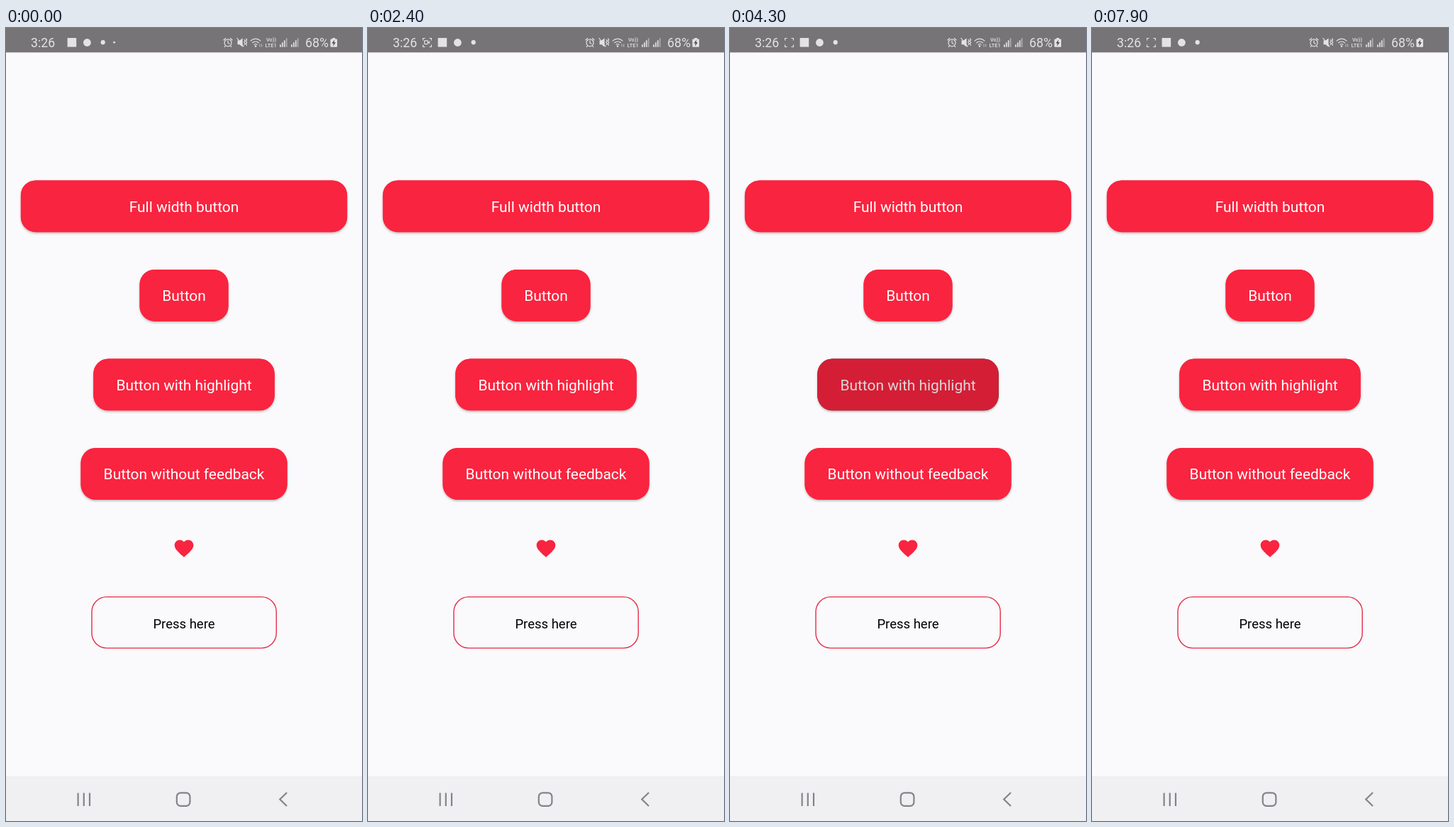
Recreate the animation shown at these times as an HTML page. Size 502x1116 px, loop 8000 ms.

```html
<!DOCTYPE html>
<html lang="en">
<head>
<meta charset="utf-8">
<title>Button feedback</title>
<style>
  html, body { margin: 0; width: 100%; height: 100%; overflow: hidden; background: #faf9fb; }
  svg { display: block; width: 502px; height: 1116px; }
  text { font-family: Roboto, sans-serif; }
  .label { font-size: 20.9px; fill: #fff; text-anchor: middle; }
  .face { fill: #f9243f; }
  .line { fill: none; stroke: #e4e3e4; stroke-width: 1.2; }
  .solid { fill: #e4e3e4; }
  .clock { font-size: 17.7px; fill: #e4e3e4; }
  .tiny { font-size: 7.4px; font-weight: 500; fill: #e4e3e4; }
  .nav { fill: none; stroke: #858387; stroke-width: 2.2; }
</style>
</head>
<body>
<svg viewBox="0 0 502 1116">
  <defs>
    <filter id="shadow" x="-10%" y="-20%" width="120%" height="150%">
      <feDropShadow dx="0" dy="1.8" stdDeviation="1.8" flood-color="#000" flood-opacity=".27"/>
    </filter>
  </defs>
  <rect width="502" height="1116" fill="#faf9fb"/>

  <g id="buttons"></g>

  <path class="face" transform="translate(235 716.4) scale(1.333)"
    d="M12 21.35l-1.45-1.32C5.4 15.36 2 12.28 2 8.5 2 5.42 4.42 3 7.5 3c1.74 0 3.41.81 4.5 2.09C13.09 3.81 14.76 3 16.5 3 19.58 3 22 5.42 22 8.5c0 3.78-3.4 6.86-8.55 11.54z"/>

  <rect x="121" y="800.6" width="260.2" height="72" rx="21" fill="none" stroke="#e42c48" stroke-width="1.4"/>
  <text x="251" y="844.5" font-size="18.5" text-anchor="middle">Press here</text>

  <!-- status bar -->
  <rect width="502" height="34.4" fill="#767476"/>
  <text class="clock" x="35" y="27">3:26</text>

  <g id="capture">
    <path class="line" d="M77.6 17.5v-3h3M86.4 14.5h3v3M89.4 23.5v3h-3M80.6 26.5h-3v-3"/>
    <g id="camera">
      <rect class="line" x="79.6" y="17.8" width="4.8" height="4.8" rx=".8" stroke-width="1"/>
      <path class="solid" d="M84.6 20.2l2.6-2.2v4.4z"/>
    </g>
  </g>
  <g id="notices">
    <rect class="solid" x="98.6" y="14" width="12.6" height="12.6"/>
    <circle class="solid" cx="126.4" cy="20.5" r="5.4"/>
    <circle class="solid" cx="148.7" cy="20.2" r="3.1"/>
  </g>
  <circle id="overflow" class="solid" cx="152.6" cy="20.2" r="1.4"/>

  <!-- alarm -->
  <g class="line" stroke-width="1.5">
    <circle cx="313" cy="20.8" r="5"/>
    <path d="M313 17.6v3.4l2.4 1.6M306.6 17.2l3.4-3M319.4 17.2l-3.4-3M309.4 25l-1.4 2M316.6 25l1.4 2"/>
  </g>
  <!-- muted sound with vibration -->
  <path class="solid" d="M326.5 17.6h3l4-3.4v12.6l-4-3.6h-3z"/>
  <path class="line" d="M325.6 14l9.6 12.4M335.8 16l1.4 2-1.4 2 1.4 2-1.4 2M338.4 14.6l1.2 2-1.2 2 1.2 2-1.2 2 1.2 2"/>
  <!-- wireless -->
  <path class="line" stroke-width="1.5" d="M344.6 18.4q7.4-6.6 14.8 0M347.2 21q4.8-4 9.6 0M349.6 23.4q2.4-1.8 4.8 0"/>
  <circle class="solid" cx="352" cy="25.6" r="1.3"/>
  <path class="line" stroke-width="1" d="M358 22.5v4M360.6 22.5v4" opacity=".6"/>
  <text class="tiny" x="367" y="18.6">Vo))</text>
  <text class="tiny" x="365.6" y="26.8">LTE1</text>
  <g id="signal" class="solid"></g>
  <text class="clock" x="422" y="27">68%</text>
  <path class="solid" d="M460.2 14h4v1.5h1.8q1 0 1 1v9.3q0 1-1 1h-7.6q-1 0-1-1v-9.3q0-1 1-1h1.8z"/>
  <path d="M463.4 16.5l-4 5h2.4l-.8 4 4-5.2h-2.4z" fill="#4c4a4c"/>

  <!-- navigation bar -->
  <rect y="1053" width="502" height="63" fill="#f0eff2"/>
  <path class="nav" d="M101.6 1076.5v18.5M109.8 1076.5v18.5M118 1076.5v18.5"/>
  <rect class="nav" x="240.8" y="1076.3" width="18.6" height="18.6" rx="5.4"/>
  <path class="nav" d="M396 1076l-9.8 9.5 9.8 9.5"/>
</svg>

<script>
const LOOP = 8000, FRAME = 50;
const HEIGHT = 72.8, CENTER_X = 251;
const ENTER = 225, FADE_IN = 75, FADE_OUT = 150, RIPPLE_ALPHA = 0.12;
const svgNS = 'http://www.w3.org/2000/svg';
const byId = id => document.getElementById(id);
const clamp = v => Math.min(1, Math.max(0, v));
const mix = (a, b, p) => a + (b - a) * p;

function add(parent, tag, attrs, text) {
  const node = document.createElementNS(svgNS, tag);
  set(node, attrs);
  if (text) node.textContent = text;
  return parent.appendChild(node);
}
function set(node, attrs) {
  for (const key in attrs) node.setAttribute(key, attrs[key]);
}

// cubic-bezier(.4, 0, .2, 1)
function fastOutSlowIn(x) {
  let low = 0, high = 1, s = 0.5;
  for (let i = 0; i < 16; i++) {
    s = (low + high) / 2;
    const at = 1.2 * s * (1 - s) ** 2 + 0.6 * s * s * (1 - s) + s ** 3;
    if (at < x) low = s; else high = s;
  }
  return s * s * (3 - 2 * s);
}

const buttons = [
  { label: 'Full width button', y: 214.4, width: 460.2, touch: [250, 251], ripples: [685, 1285, 1670] },
  { label: 'Button', y: 339.9, width: 125, touch: [223, 358], ripples: [2535, 3030, 3390] },
  { label: 'Button with highlight', y: 465.5, width: 255.4, presses: [[4300, 4400], [4700, 5200], [5400, 5750]] },
  { label: 'Button without feedback', y: 591, width: 291 }
];

buttons.forEach((button, i) => {
  const { label, y, width, ripples = [] } = button;
  const box = { x: CENTER_X - width / 2, y, width, height: HEIGHT, rx: 21 };
  const clip = add(document.querySelector('defs'), 'clipPath', { id: 'clip' + i });
  add(clip, 'rect', box);
  button.base = add(byId('buttons'), 'rect', { ...box, fill: '#f9243f', filter: 'url(#shadow)' });
  button.content = add(byId('buttons'), 'g', {});
  add(button.content, 'rect', { ...box, class: 'face' });
  const layer = add(button.content, 'g', { 'clip-path': `url(#clip${i})` });
  button.circles = ripples.map(() => add(layer, 'circle', {}));
  add(button.content, 'text', { x: CENTER_X, y: y + 44.3, class: 'label' }, label);
});

for (const left of [386, 402]) {
  for (let i = 0; i < 4; i++) {
    const height = 3.5 + i * 3;
    add(byId('signal'), 'rect', {
      x: left + i * 2.9, y: 26.8 - height, width: 1.8, height, opacity: i < 3 ? 0.95 : 0.5
    });
  }
}

function drawRipple(circle, button, age) {
  const p = fastOutSlowIn(clamp(age / ENTER));
  const alpha = age < 0 ? 0 : clamp(age / FADE_IN) * (1 - clamp((age - ENTER) / FADE_OUT));
  set(circle, {
    cx: mix(button.touch[0], CENTER_X, p),
    cy: mix(button.touch[1], button.y + HEIGHT / 2, p),
    r: mix(button.width * 0.3, Math.hypot(button.width, HEIGHT) / 2 + 1, p),
    opacity: alpha * RIPPLE_ALPHA
  });
}

function drawStatus(t) {
  const p = 1 - (1 - clamp(t / 250)) ** 2;
  set(byId('notices'), { transform: `translate(${mix(-12, 0, p)} 0)` });
  set(byId('capture'), { opacity: p });
  set(byId('overflow'), { opacity: 1 - p, r: 1.4 * (1 - p) });
  const lit = t >= 450 && Math.floor((t - 400) / 500) % 2 === 0;
  set(byId('camera'), { opacity: lit ? 1 : 0 });
}

function draw(t) {
  drawStatus(t);
  for (const button of buttons) {
    button.circles.forEach((circle, i) => drawRipple(circle, button, t - button.ripples[i]));
    if (button.presses) {
      const pressed = button.presses.some(([on, off]) => t >= on && t < off);
      set(button.base, { fill: pressed ? '#000' : '#f9243f' });
      set(button.content, { opacity: pressed ? 0.85 : 1 });
    }
  }
}

const start = performance.now();
function tick() {
  const t = (performance.now() - start) % LOOP;
  draw(Math.floor(t / FRAME) * FRAME);
  requestAnimationFrame(tick);
}
tick();
</script>
</body>
</html>
```
